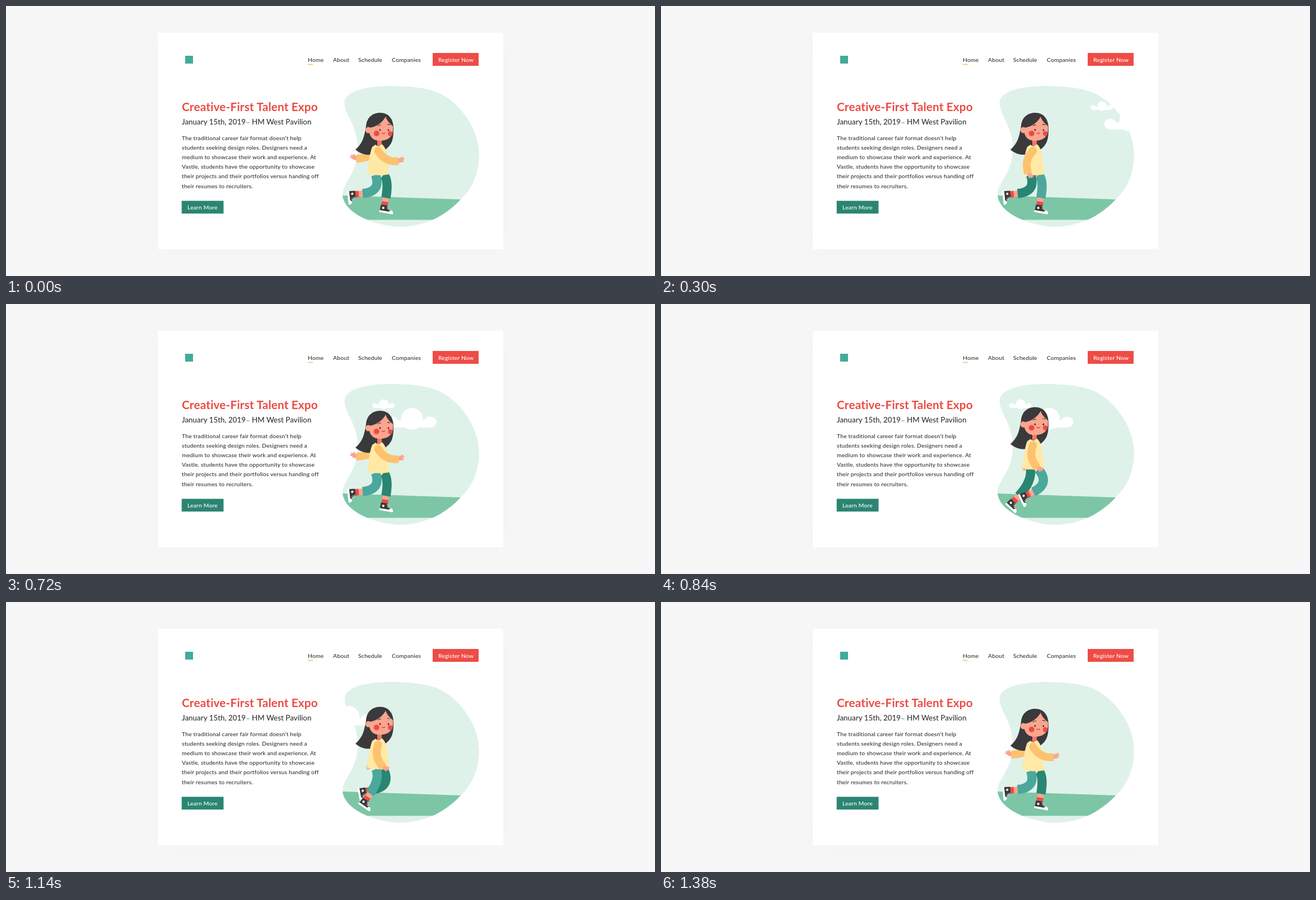
These frames come from a looping animation (1159x483 px, 1.44 s). An HTML page with a canvas:

```html
<!DOCTYPE html>
<html lang="en">
<head>
<meta charset="utf-8">
<title>Talent Expo</title>
<style>
  html, body { margin: 0; width: 100%; height: 100%; overflow: hidden; background: #f7f7f7; }
  svg, canvas { position: absolute; left: 0; top: 0; width: 1159px; height: 483px; }
  text { font: 500 10.4px Lato, "Open Sans", sans-serif; letter-spacing: .14px; fill: #333235; }
  .title { font-weight: 700; font-size: 20.8px; fill: #ec4b44; }
  .sub { font-size: 13.4px; letter-spacing: 0; }
  .light { fill: #fff; }
  .card { fill: #fff; filter: drop-shadow(0 4px 18px rgba(0, 0, 0, .015)); }
</style>
</head>
<body>
<svg viewBox="0 0 1159 483">
  <rect class="card" x="271" y="48" width="617" height="387"/>
  <rect x="320" y="89" width="14" height="14" fill="#42ab9a"/>
  <text x="539" y="99.6">Home</text>
  <text x="584" y="99.6">About</text>
  <text x="629" y="99.6">Schedule</text>
  <text x="689" y="99.6">Companies</text>
  <rect x="539" y="103.7" width="9" height="1.7" fill="#fcc26a"/>
  <rect x="762" y="84" width="82" height="23" fill="#ee4c46"/>
  <text class="light" x="772" y="99.6">Register Now</text>
  <text class="title" x="314" y="188">Creative-First Talent Expo</text>
  <text class="sub" x="314" y="212.3">January 15th, 2019</text>
  <rect x="429.5" y="208.2" width="5.5" height="1.3" fill="#5bb8a6"/>
  <text class="sub" x="439" y="212.3">HM West Pavilion</text>
  <text x="314" y="239.8">The traditional career fair format doesn’t help</text>
  <text x="314" y="256.9">students seeking design roles. Designers need a</text>
  <text x="314" y="274">medium to showcase their work and experience. At</text>
  <text x="314" y="291.2">Vastle, students have the opportunity to showcase</text>
  <text x="314" y="308.4">their projects and their portfolios versus handing off</text>
  <text x="314" y="325.5">their resumes to recruiters.</text>
  <rect x="313.7" y="348.5" width="74.8" height="22.8" fill="#2b8572"/>
  <text class="light" x="324" y="363.6">Learn More</text>
</svg>
<canvas id="scene" width="1159" height="483"></canvas>
<script>
const ctx = document.getElementById('scene').getContext('2d');
const LOOP = 1440, CYCLE = 720, WALK = 660, STEP = 60;
const SKIN = '#fba58e', RED = '#ee4b45', HAIR = '#3a393b', SHIRT = '#ffe9a5',
      SLEEVE = '#fdc270', TEAL = '#4ca79c', GREEN = '#2a8572';

const blob = new Path2D('M604.5 174C604 150 650 143 684 143C746 143 773 151 795 169' +
  'C822 191 845 228 845 266C845 300 832 328 812 346C791 369 754 395 704 395' +
  'C664 395 601 372 601 336C601 316 628 300 628 254C628 215 604.5 195 604.5 174Z');
const ground = new Path2D('M600 339L812 346V382.6H600Z');
const hair = new Path2D('M668 191C684 191 693 203 692 222C692 240 688 250 677 257L660 262' +
  'C650 269 636 267 624 257C638 245 640 232 643 215C644 200 654 191 668 191Z');
const face = new Path2D('M648 218C660 217 672 209 678 198C681 207 687 211 691 215' +
  'C693 232 684 241 668 241C655 241 648 234 648 218Z');
const torso = new Path2D('M660 248C664 252 668 251 671 247C678 252 681 264 682 280L684.5 301' +
  'C672 304 656 303 645 300C647 280 650 262 654 252Z');
const shoe = new Path2D('M-6.5 -1L6 -1L7 4C10 6 14 7 16 11L-7 11Z');
const sole = new Path2D('M-7.5 9.5L10 9.5C10 7 12 6 14 6.5C17 8 18 11 17 13L-7.5 13Z');
const laces = new Path2D('M4 1L7 .5M5 4L8.5 3M7 6.5L10.5 5');

const rad = deg => deg * Math.PI / 180;
const ramp = (u, from, to) => Math.min(1, Math.max(0, (u - from) / (to - from)));
const ease = (u, from, to) => {
  const k = ramp(u, from, to);
  return k * k * (3 - 2 * k);
};

function fill(path, color) {
  ctx.fillStyle = color;
  ctx.fill(path);
}

function oval(x, y, rx, ry, color) {
  ctx.fillStyle = color;
  ctx.beginPath();
  ctx.ellipse(x, y, rx, ry, 0, 0, 7);
  ctx.fill();
}

function curve(x1, y1, cx, cy, x2, y2, width, color) {
  ctx.strokeStyle = color;
  ctx.lineWidth = width;
  ctx.beginPath();
  ctx.moveTo(x1, y1);
  ctx.quadraticCurveTo(cx, cy, x2, y2);
  ctx.stroke();
}

function line(x1, y1, x2, y2, width, color) {
  curve(x1, y1, x1, y1, x2, y2, width, color);
}

// u runs 0..1: swing forward, stand, push back, kick up
function drawLeg(u, lift, color) {
  const step = ease(u, 0.1, 0.34), push = ease(u, 0.5, 0.73), kick = ease(u, 0.84, 0.95);
  const x = 623 + 53 * (ease(u, 0, 0.34) - push);
  const y = 337 + 20 * step - 4 * push - 16 * kick;
  const tilt = rad(84 - 74 * step + 38 * push + 36 * kick);
  const hip = 660 + 14 * (ease(u, 0, 0.12) - ease(u, 0.5, 0.64));
  const shin = d => [x + d * Math.sin(tilt), y - d * Math.cos(tilt)];

  line(...shin(15), ...shin(6), 11, SKIN);
  line(...shin(7), x, y, 11.5, RED);
  curve(hip, 302 + lift, ...shin(48), ...shin(14), 16.5, color);
  ctx.save();
  ctx.translate(x, y);
  ctx.rotate(tilt);
  fill(shoe, HAIR);
  fill(sole, '#fff');
  oval(-1.5, 4.5, 2.1, 2.1, '#fff');
  ctx.strokeStyle = '#fff';
  ctx.lineWidth = 1;
  ctx.stroke(laces);
  ctx.restore();
}

// angle is measured from straight down, positive to the front
function drawArm(x, y, angle, length, bend, turn) {
  const dx = Math.sin(angle), dy = Math.cos(angle);
  const wx = x + dx * length, wy = y + dy * length;
  const ex = x + dx * length / 2 - dy * bend, ey = y + dy * length / 2 + dx * bend;
  ctx.save();
  ctx.translate(wx, wy);
  ctx.rotate(Math.atan2(wy - ey, wx - ex) + turn);
  oval(3.5, 0, 5.5, 4, SKIN);
  ctx.lineCap = 'round';
  line(4, -1.5, 10, -2, 2.6, SKIN);
  line(4, 1, 10, 1.2, 2.6, SKIN);
  line(2, 2, 7, 4.4, 2.4, SKIN);
  ctx.restore();
  oval(x, y, 7, 7, SLEEVE);
  curve(x, y, ex, ey, wx, wy, 14, SLEEVE);
}

function drawHead() {
  oval(647, 222, 5, 5.5, SKIN);
  fill(face, SKIN);
  oval(661.8, 228, 5, 5, RED);
  oval(686.2, 228.3, 4.2, 4.4, RED);
  oval(668, 221.8, 1.4, 1.8, HAIR);
  oval(683, 222, 1.4, 1.8, HAIR);
  curve(664, 214.5, 666.5, 212, 670, 213, 1.1, HAIR);
  curve(681, 212.5, 683.5, 210.5, 686.5, 213, 1.1, HAIR);
  curve(671, 226.8, 674, 229.8, 677, 226.8, 1.5, '#d9403d');
}

function drawCloud(x, bottom, size) {
  oval(x + 11 * size, bottom - 9.6 * size, 11 * size, 9.6 * size, '#fff');
  oval(x + 46.5 * size, bottom - 15.5 * size, 19.5 * size, 19.5 * size, '#fff');
  oval(x + 79 * size, bottom - 9.8 * size, 11.5 * size, 9.8 * size, '#fff');
  ctx.fillRect(x + 11 * size, bottom - 13 * size, 68 * size, 13 * size);
}

function drawBackdrop(t) {
  const x = 848 - 0.2695 * t;
  ctx.save();
  ctx.clip(blob);
  fill(blob, '#dff2e9');
  fill(ground, '#7cc6a6');
  drawCloud(x, 186, 0.445);
  drawCloud(x + 24.4, 221, 1);
  ctx.restore();
}

function drawGirl(u) {
  const half = u * 2 % 1;
  const lift = -9 * (ease(half, 0.1, 0.5) - ease(half, 0.65, 0.92));
  const swing = rad(63 - 91 * ease(u, 0, 0.33) + 91 * ramp(u, 0.34, 1));
  const back = -1.2 * swing;

  drawArm(664 + 8 * Math.sin(back), 265 + lift, back, 32, -4, 0.5);
  ctx.save();
  ctx.translate(0, lift);
  fill(hair, HAIR);
  ctx.restore();
  drawLeg((u + 0.5) % 1, lift, GREEN);
  drawLeg(u, lift, TEAL);
  ctx.save();
  ctx.translate(0, lift);
  line(667, 238, 667, 250, 8, '#f4746a');
  fill(torso, SHIRT);
  drawHead();
  ctx.restore();
  drawArm(664.5, 259 + lift, swing, 41, 13, -0.45);
}

function tick() {
  const now = performance.now() % LOOP;
  const t = Math.floor(now / STEP) * STEP;
  ctx.clearRect(0, 0, 1159, 483);
  drawBackdrop(t);
  drawGirl(Math.min(1, t % CYCLE / WALK));
  requestAnimationFrame(tick);
}
tick();
</script>
</body>
</html>
```
